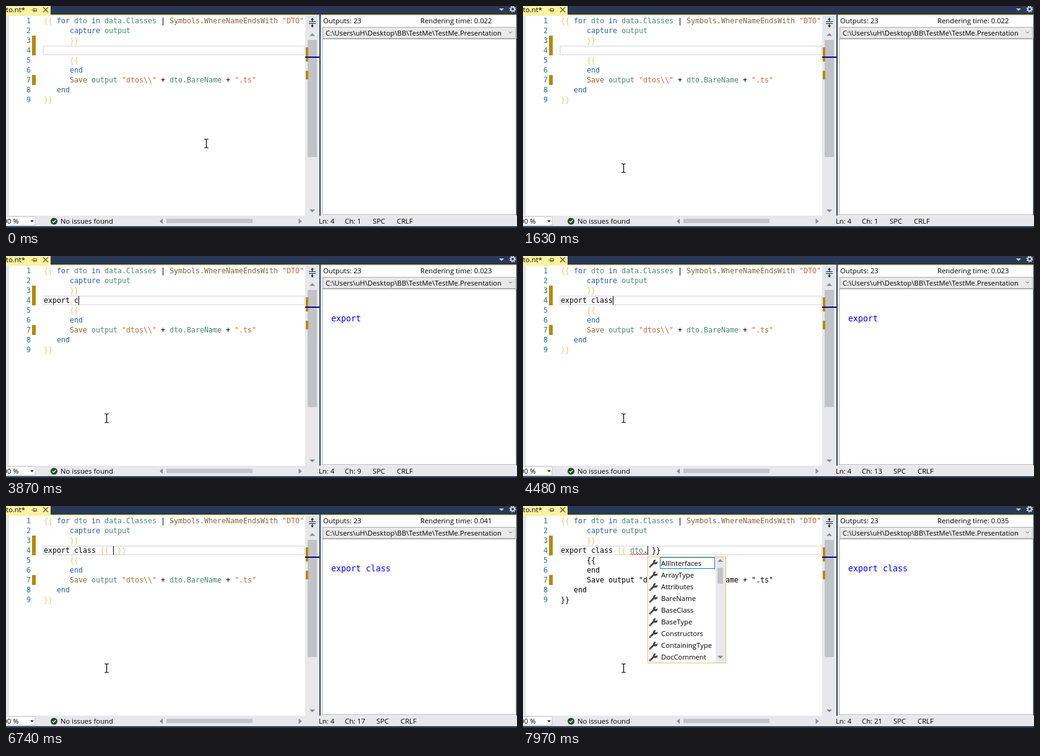
Write an HTML page that moves like this. It is 825x360 px and loops after 8000 ms.

```html
<!DOCTYPE html>
<html lang="en">
<head>
<meta charset="utf-8">
<title>Template editor</title>
<style>
  html, body { margin: 0; width: 100%; height: 100%; overflow: hidden; background: #fff; }
  svg { display: block; }
  text { font: 11.3px "Open Sans", sans-serif; white-space: pre; fill: #000; }
  .code text { font: 11.63px "DejaVu Sans Mono", monospace; }
  .num { text-anchor: end; }
  .code .num { fill: #237893; }
  .k { fill: #315c9c; }
  .i { fill: #4b8973; }
  .f { fill: #836636; }
  .s { fill: #c06a42; }
  .b { fill: #eac878; }
  .late tspan { fill: #000; }
  text#preview { font: 13.29px "DejaVu Sans Mono", monospace; fill: #00f; }
  .bar { fill: #e8e8ec; }
  .thumb { fill: #c2c3c9; }
  .arrow { fill: #868999; }
  .gold { fill: #b58a08; }
  .navy { fill: #293955; }
  .line { fill: none; }
</style>
</head>
<body>
<svg width="825" height="360" viewBox="0 0 825 360">
  <defs>
    <clipPath id="pane"><rect x="0" y="16" width="483" height="324"/></clipPath>
    <g id="wrench" fill="none" stroke="#424242">
      <path d="M1.5 12.5L8 6" stroke-width="3" stroke-linecap="round"/>
      <path d="M10.5 1.6A3.3 3.3 0 1 0 13.4 4.6L10.6 6L9 4.4Z" fill="#424242" stroke-width="1"/>
      <path d="M2 12.2L3 11.2" stroke="#fff"/>
    </g>
  </defs>
  <rect width="825" height="360" fill="#fff"/>

  <!-- title strip -->
  <rect class="navy" width="825" height="14"/>
  <rect y="14" width="825" height="2" fill="#fff29d"/>
  <rect width="72" height="16" fill="#fdf2a3"/>
  <text x="0" y="10">to.nt*</text>
  <g class="line" stroke="#6b633a">
    <path d="M41 6.5H44M44.5 3V10M44.5 4.5H49.5V8.5H44.5M45 7.5H49"/>
    <path d="M60 2L68 10M68 2L60 10" stroke-width="1.5"/>
  </g>
  <path d="M796 4H804L800 8Z" fill="#ced4dd"/>
  <circle cx="818" cy="5" r="3" fill="none" stroke="#ced4dd" stroke-width="2"/>
  <circle cx="818" cy="5" r="4.6" fill="none" stroke="#ced4dd" stroke-width="1.6" stroke-dasharray="1.8 1.81"/>

  <!-- editor -->
  <rect x="0" y="16" width="5" height="325" fill="#e6e7e8"/>
  <path class="gold" d="M42 48h6v32h-6zM42 112h6v16h-6z"/>
  <rect x="60" y="65" width="422" height="14" fill="none" stroke="#e6e6ef" stroke-width="2"/>
  <g class="code" clip-path="url(#pane)">
    <g id="numbers"></g>
    <text x="61" y="28"><tspan class="b">{{</tspan> <tspan class="k">for</tspan> <tspan class="i">dto</tspan> <tspan class="k">in</tspan> <tspan class="i">data.Classes</tspan> | <tspan class="f">Symbols.WhereNameEndsWith</tspan> <tspan class="s">"DTO"</tspan></text>
    <text x="103" y="44"><tspan class="k">capture</tspan> <tspan class="i">output</tspan></text>
    <text x="103" y="60"><tspan class="b">}}</tspan></text>
    <text x="61" y="76"><tspan id="plain"></tspan><tspan id="open" class="b"></tspan><tspan id="name" class="i"></tspan><tspan id="dot"></tspan><tspan id="close"></tspan></text>
    <g id="rest">
      <text x="103" y="92"><tspan class="b">{{</tspan></text>
      <text x="103" y="108"><tspan class="k">end</tspan></text>
      <text x="103" y="124"><tspan class="f">Save</tspan> <tspan class="i">output</tspan> <tspan class="s">"dtos\\"</tspan> + <tspan class="i">dto.BareName</tspan> + <tspan class="s">".ts"</tspan></text>
      <text x="82" y="140"><tspan class="k">end</tspan></text>
      <text x="61" y="156"><tspan class="b">}}</tspan></text>
    </g>
  </g>
  <rect id="caret" y="65" width="1" height="14"/>

  <!-- vertical scroll bar -->
  <rect class="bar" x="483" y="16" width="23" height="325"/>
  <rect x="485" y="16" width="19" height="21" fill="#dfe6f2"/>
  <path class="line" d="M489 25.5H500M489 28.5H500M494.5 20V25M494.5 29V34" stroke="#1e1e1e"/>
  <path d="M492 22.5L494.5 19L497 22.5ZM492 31.5L494.5 35L497 31.5Z" fill="#1e1e1e"/>
  <rect class="thumb" x="487" y="55" width="15" height="190"/>
  <path class="arrow" d="M490 48.5H499L494.5 44ZM490 330H499L494.5 334.5Z"/>
  <path class="gold" d="M484 67h4v23h-4zM484 105h4v14h-4z"/>
  <rect x="483" y="82" width="23" height="2" fill="#00008b"/>

  <!-- output panel -->
  <path class="navy" d="M506 14h2v326h-2zM824 14h1v326h-1z"/>
  <text x="512" y="28">Outputs: 23</text>
  <text x="669" y="28" id="time"></text>
  <rect class="line" x="510.5" y="53.5" width="313" height="285" stroke="#abadb3"/>
  <rect x="511.5" y="34.5" width="311" height="18" fill="#e9e9e9" stroke="#acacac"/>
  <text x="516" y="48">C:\Users\uH\Desktop\BB\TestMe\TestMe.Presentation</text>
  <path class="line" d="M812 41.5L814.5 44L817 41.5" stroke="#606060"/>
  <text x="525" y="106" id="preview"></text>

  <!-- status bar -->
  <rect class="bar" y="340" width="825" height="17"/>
  <rect class="navy" y="357" width="825" height="3"/>
  <rect x="-1" y="341.5" width="48" height="14" fill="#fff" stroke="#c6c8d2"/>
  <text x="20.5" y="353" class="num">00 %</text>
  <path d="M39 347.5H45L42 350.5Z" fill="#1e1e1e"/>
  <circle cx="77.5" cy="349" r="5.5" fill="#1d4a25"/>
  <path class="line" d="M74.8 349L76.8 351L80.4 347" stroke="#fff" stroke-width="1.4"/>
  <text x="88" y="353">No issues found</text>
  <rect class="thumb" x="259" y="345" width="139" height="7"/>
  <path class="arrow" d="M253 344.5V353.5L248 349ZM472.5 344.5V353.5L477.5 349Z"/>
  <text x="505" y="353">Ln: 4</text>
  <text x="547" y="353" id="col"></text>
  <g id="modes"><text x="592" y="353">SPC</text><text x="631" y="353">CRLF</text></g>

  <!-- completion list -->
  <g id="popup">
    <path class="line" d="M173 79l2-2l2 2l2-2l2 2l2-2l2 2l2-2l2 2l2-2l2 2l2-2l2 2l2-2l2 2" stroke="#f01414"/>
    <rect x="201.5" y="82.5" width="126" height="172" fill="#fff" stroke="#e0c069"/>
    <rect class="bar" x="311" y="83" width="16" height="171"/>
    <rect class="thumb" x="314" y="100" width="9" height="26"/>
    <path class="arrow" d="M314 90.5H323L318.5 86ZM314 243H323L318.5 247.5Z"/>
    <rect class="line" x="221.5" y="83.5" width="88" height="18" stroke="#0078d7"/>
    <g id="items"></g>
  </g>

  <path id="mouse" class="line" stroke="#000" stroke-width="1.2" d="M-3.5 -6.5H-1L0 -5.5L1 -6.5H3.5M0 -5.5V6.5M-3.5 7.5H-1L0 6.5L1 7.5H3.5"/>
</svg>
<script>
  const LOOP = 8000, CHAR = 7, LEFT = 61;
  const LINE = 'export class {{ dto.';
  const $ = id => document.getElementById(id);

  // time, characters of LINE typed, text after them, caret offset
  const keys = [
    [0, 0], [1830, 1], [2250, 2], [2450, 3], [2660, 4], [2860, 5], [3070, 6], [3460, 7],
    [3870, 8], [4070, 9], [4280, 10], [4480, 12], [4890, 13], [5300, 14],
    [5510, 15, '}}'], [6120, 16, '}}'], [6330, 16, ' }}', 1], [6530, 16, ' }}'],
    [7140, 17, ' }}'], [7350, 18, ' }}'], [7560, 19, ' }}'], [7970, 20, ' }}']
  ];
  // time, rendering time, output
  const renders = [
    [0, '0.022', ''], [3460, '0.023', 'export'], [5710, '0.138', 'export class'],
    [6740, '0.041', 'export class'], [7350, '0.035', 'export class']
  ];
  // time, x, y
  const moves = [
    [0, 323, 222], [200, 312, 221], [410, 296, 219], [610, 276, 217],
    [820, 256, 217], [1020, 234, 219], [1220, 208, 222], [1430, 162, 262]
  ];
  const blinks = [[0, 0], [200, 1], [610, 0], [1220, 1], [1630, 0], [1830, 1]];

  const at = (list, t) => list.findLast(step => step[0] <= t);
  const set = (id, text) => { if ($(id).textContent !== text) $(id).textContent = text; };

  $('numbers').innerHTML = Array.from({ length: 9 }, (_, i) =>
    `<text class="num" x="40" y="${28 + 16 * i}">${i + 1}</text>`).join('');
  $('items').innerHTML = ['AllInterfaces', 'ArrayType', 'Attributes', 'BareName', 'BaseClass',
    'BaseType', 'Constructors', 'ContainingType', 'DocComment'].map((name, i) =>
    `<use href="#wrench" x="203.5" y="${86 + 19 * i}"/><text x="223" y="${97 + 19 * i}">${name}</text>`).join('');

  function draw(t) {
    const [, count, after = '', shift = 0] = at(keys, t);
    const [, time, output] = at(renders, t);
    const [, x, y] = at(moves, t);
    const typed = LINE.slice(0, count), pos = count + shift, popup = t >= 7970;

    set('plain', typed.slice(0, 13));
    set('open', typed.slice(13, 15));
    set('name', typed.slice(15, 19));
    set('dot', typed.slice(19));
    set('close', after);
    $('close').setAttribute('class', popup ? '' : 'b');
    $('rest').setAttribute('class', popup ? 'late' : '');
    $('popup').style.display = popup ? '' : 'none';

    $('caret').setAttribute('x', LEFT + CHAR * pos);
    $('caret').style.opacity = at(blinks, t)[1];
    set('col', 'Ch: ' + (pos + 1));
    $('modes').setAttribute('transform', `translate(${pos > 8 ? 6 : 0} 0)`);
    set('time', 'Rendering time: ' + time);
    set('preview', output);
    $('mouse').setAttribute('transform', `translate(${x + .5} ${y + .5})`);
  }

  const start = performance.now();
  function tick() {
    draw((performance.now() - start) % LOOP);
    requestAnimationFrame(tick);
  }
  tick();
</script>
</body>
</html>
```
